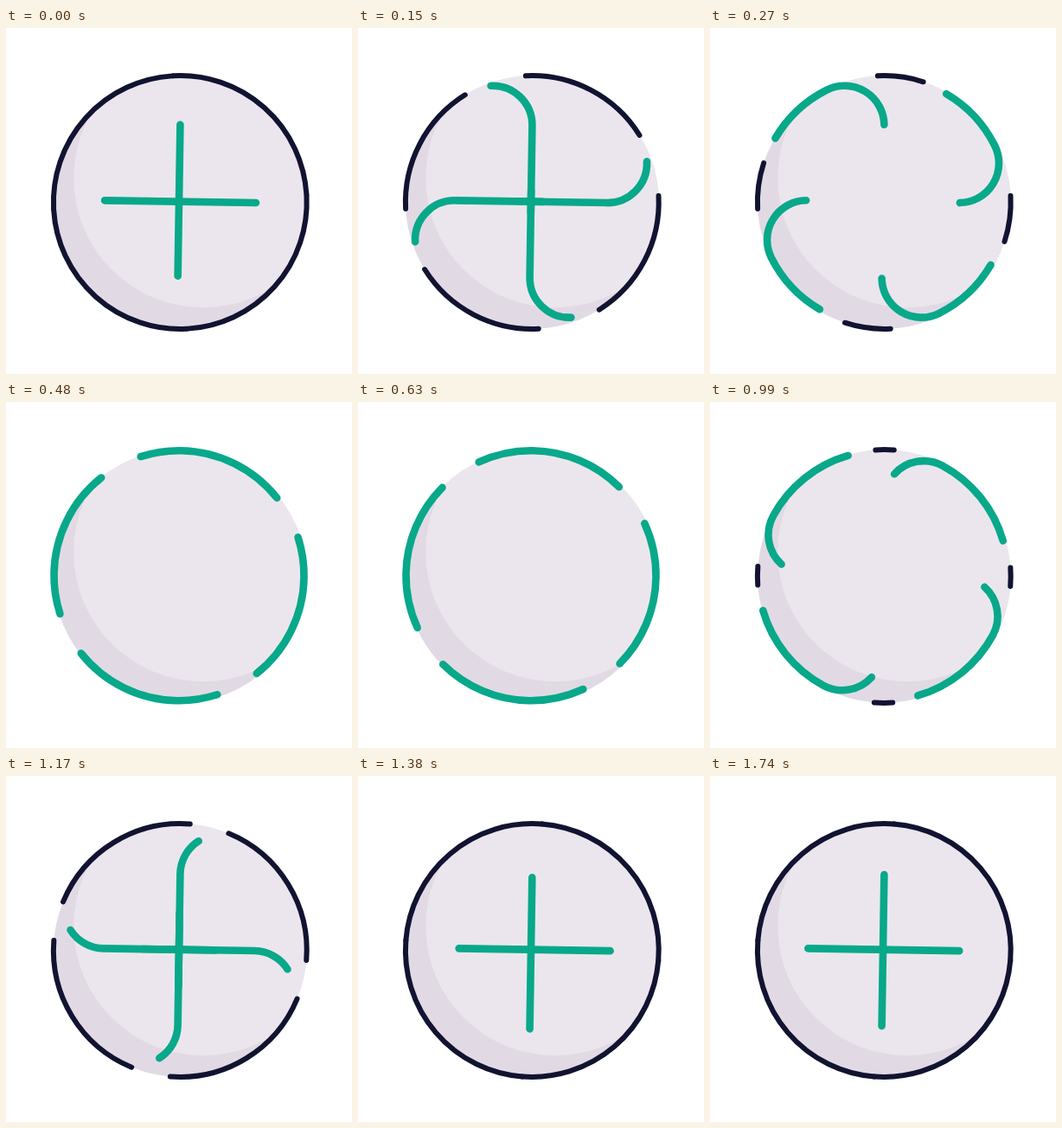
Write an HTML page that moves like this. It is 400 px wide and 400 px high and loops after 3860 ms.

```html
<!DOCTYPE html>
<html lang="en">
<head>
<meta charset="utf-8">
<title>Plus</title>
<style>
  html, body { margin: 0; width: 100%; height: 100%; overflow: hidden; background: #fff; }
  svg { display: block; width: 100%; height: 100%; }
  path { fill: none; stroke-linecap: round; }
</style>
</head>
<body>
<svg viewBox="0 0 400 400">
  <clipPath id="disc"><circle cx="201.3" cy="201.5" r="146.4"/></clipPath>
  <g clip-path="url(#disc)">
    <rect width="400" height="400" fill="#e1dae5"/>
    <circle cx="228" cy="173.5" r="149.7" fill="#ebe6ed"/>
  </g>
  <g id="rim" transform="translate(201.3 201.5)" stroke="#121331" stroke-width="6"></g>
  <g id="plus" transform="translate(200 200.7) rotate(0.9)" stroke="#08a88a" stroke-width="8.6"></g>
</svg>
<script>
const LOOP = 3860, STEP = 30;
const ARM = 87.5, R = 144.5, RIM = 146.4;
const DEG = Math.PI / 180;

// The hook is tangent to the arm's tip and to the big circle.
const HOOK = (R * R - ARM * ARM) / (2 * R);
const BAR = 2 * ARM;
const hookAngle = Math.PI - Math.atan2(ARM, HOOK);
const END = BAR + 2 * HOOK * hookAngle + R * (2 * hookAngle - Math.PI + 2 * (Math.PI - hookAngle) * 0 + 2 * (Math.PI - hookAngle) - 2 * (hookAngle - Math.PI / 2));
const MID = 315;
const QUARTER = RIM * Math.PI / 2;

const touch = R / (R - HOOK);
const tx = -HOOK * touch, ty = ARM * touch;
const track = `M0 ${ARM}V${-ARM}A${HOOK} ${HOOK} 0 0 0 ${tx} ${-ty}` +
  `A${R} ${R} 0 0 0 ${tx} ${ty}A${HOOK} ${HOOK} 0 0 0 0 ${ARM}V-140`;

function addPaths(id, attrs) {
  const parent = document.getElementById(id);
  return [0, 1, 2, 3].map(k => {
    const p = document.createElementNS("http://www.w3.org/2000/svg", "path");
    p.setAttribute("transform", `rotate(${-90 * k})`);
    for (const name in attrs) p.setAttribute(name, attrs[name]);
    return parent.appendChild(p);
  });
}

const rims = addPaths("rim", {});
const bars = addPaths("plus", { d: track, "stroke-dasharray": `${BAR} 5000` });

function bezier(x1, y1, x2, y2) {
  const at = (a, b, t) => 3 * a * t * (1 - t) ** 2 + 3 * b * t * t * (1 - t) + t ** 3;
  return u => {
    if (u <= 0) return 0;
    if (u >= 1) return 1;
    let lo = 0, hi = 1;
    for (let i = 0; i < 30; i++) {
      const m = (lo + hi) / 2;
      if (at(x1, x2, m) < u) lo = m; else hi = m;
    }
    return at(y1, y2, lo);
  };
}

const easeOut = bezier(0.33, 0, 0.5, 1);
const easeBack = bezier(0.549, 0, 0.134, 1.22);

const travel = t => t < 600
  ? MID * easeOut((t + 25) / 625)
  : MID + (END - MID) * easeBack((t - 600) / 1140);

function arc(from, to) {
  const pt = a => `${RIM * Math.cos(a * DEG)} ${-RIM * Math.sin(a * DEG)}`;
  return `M${pt(from)}A${RIM} ${RIM} 0 0 0 ${pt(to)}`;
}

function draw(t) {
  const s = travel(t);

  bars.forEach((bar, k) => {
    bar.setAttribute("stroke-dashoffset", -s);
    const hidden = (s < 3 && (k === 1 || k === 2)) || (s > END - 1 && k < 2);
    bar.style.display = hidden ? "none" : "";
  });

  // The rim is wiped away as the bars leave and redrawn as they return.
  const leaving = t < 600;
  const part = leaving ? 1 - s / QUARTER : 1 - (END - s) / QUARTER;
  const span = 90 * Math.min(1, part);
  const d = span <= 0 ? "" : leaving ? arc(92.9 - span, 92.9) : arc(85.5, 85.5 + span);
  rims.forEach(p => p.setAttribute("d", d));
}

const start = performance.now();
function tick() {
  const t = (performance.now() - start) % LOOP;
  draw(Math.floor(t / STEP) * STEP);
  requestAnimationFrame(tick);
}
draw(0);
tick();
</script>
</body>
</html>
```
